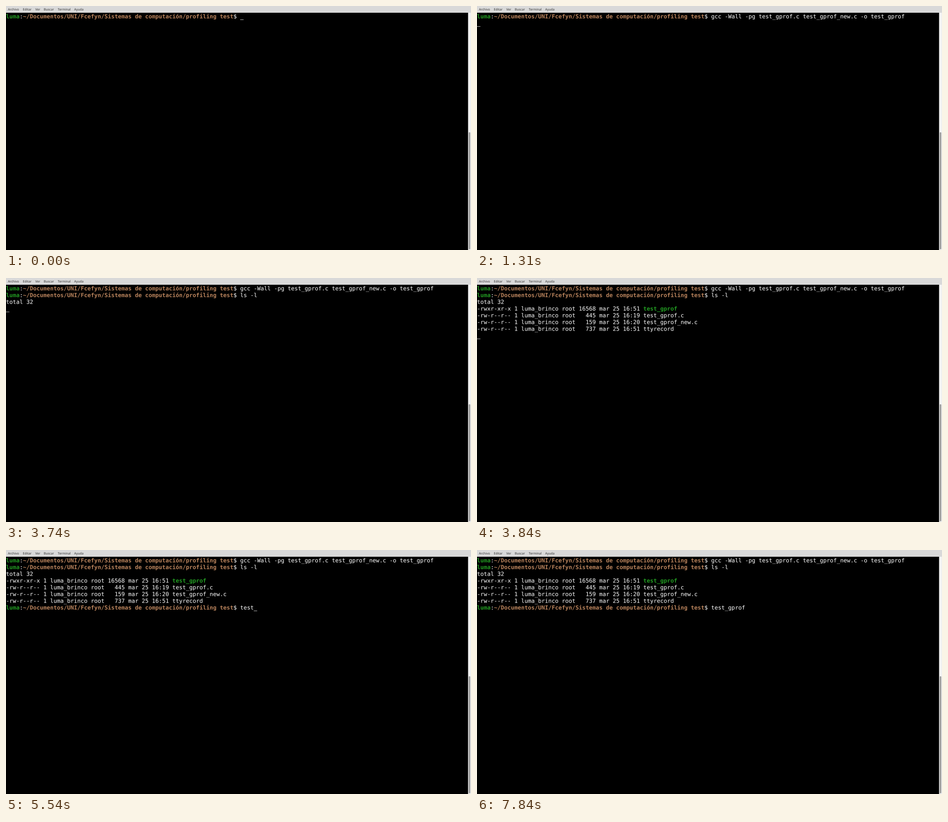
Write an HTML page with a canvas that moves like this. It is 1031x543 px and loops after 8 s.

```html
<!DOCTYPE html>
<html lang="es">
<head>
<meta charset="utf-8">
<title>Terminal</title>
<style>
  html, body { margin: 0; width: 100%; height: 100%; overflow: hidden; background: #000; }
  canvas { display: block; width: 1031px; height: 543px; }
</style>
</head>
<body>
<canvas id="stage"></canvas>
<script>
const WIDTH = 1031, HEIGHT = 543, DENSITY = 2, LOOP = 8000;
const FONT_SIZE = 12.5, ROW = 15, TOP = 15.5;
const WHITE = "#fff", GREEN = "#229a22", PATH = "#b9835c";
const USER = "luma", OWNER = "luma_brinco";
const COMPILE = "gcc -Wall -pg test_gprof.c test_gprof_new.c -o test_gprof";

const canvas = document.getElementById("stage");
const ctx = canvas.getContext("2d");
canvas.width = WIDTH * DENSITY;
canvas.height = HEIGHT * DENSITY;
ctx.scale(DENSITY, DENSITY);
ctx.textRendering = "geometricPrecision";

const monoFont = bold =>
  `${bold ? "bold " : ""}${FONT_SIZE}px "DejaVu Sans Mono", monospace`;
ctx.font = monoFont(false);
const CELL = ctx.measureText("m".repeat(100)).width / 100;

// A row is a list of runs: [text, color, bold].
const plain = text => [text, WHITE, false];
const prompt = command => [
  [USER, GREEN, true],
  plain(":"),
  ["~/Documentos/UNI/Fcefyn/Sistemas de computación/profiling test", PATH, true],
  plain("$ "),
  plain(command)
];
const file = (mode, size, time, name) => [
  plain(`${mode} 1 ${OWNER} root ${String(size).padStart(5)} mar 25 ${time} `),
  mode.includes("x") ? [name, GREEN, true] : plain(name)
];

const history = [
  prompt(COMPILE),
  prompt("ls -l"),
  [plain("total 32")],
  file("-rwxr-xr-x", 16568, "16:51", "test_gprof"),
  file("-rw-r--r--", 445, "16:19", "test_gprof.c"),
  file("-rw-r--r--", 159, "16:20", "test_gprof_new.c"),
  file("-rw-r--r--", 737, "16:51", "ttyrecord")
];

// [start ms, finished rows, command on the prompt (null: no prompt), cursor shown]
const steps = [
  [0, 0, "", true],
  [660, 0, COMPILE, true],
  [1310, 1, null, true],
  [1360, 1, "", true],
  [2130, 1, "l", true],
  [2240, 1, "ls", false],
  [2600, 1, "ls -", false],
  [3110, 1, "ls -l", false],
  [3740, 3, null, true],
  [3840, 7, null, true],
  [4800, 7, "t", true],
  [4960, 7, "te", true],
  [5370, 7, "tes", true],
  [5540, 7, "test", true],
  [6790, 7, "test_", false],
  [7230, 7, "test_g", false],
  [7420, 7, "test_gp", false],
  [7550, 7, "test_gpr", false],
  [7700, 7, "test_gpro", false],
  [7840, 7, "test_gprof", false]
];

function fillRect(color, x, y, width, height) {
  ctx.fillStyle = color;
  ctx.fillRect(x, y, width, height);
}

function drawRow(runs, row, selectedText) {
  const top = TOP + row * ROW;
  let column = 0;
  for (const [text, color, bold] of runs) {
    const selected = text && text === selectedText;
    if (selected) fillRect(WHITE, column * CELL, top, text.length * CELL, ROW + 0.25);
    ctx.font = monoFont(bold);
    ctx.fillStyle = selected ? "#000" : color;
    ctx.fillText(text, column * CELL, top + 12);
    column += text.length;
  }
  return column;
}

function drawWindow() {
  fillRect("#000", 0, 0, WIDTH, HEIGHT);
  fillRect("#f2f2f2", 1024.5, 15, 6.5, HEIGHT - 15);
  ctx.fillStyle = "#999";
  ctx.beginPath();
  ctx.roundRect(1026, 281, 3.4, 260.5, 1.5);
  ctx.fill();
  fillRect("#d9d9d9", 0, 0, WIDTH, 15);
  ctx.font = '7px "Noto Sans", sans-serif';
  ctx.fillStyle = "#333";
  const menu = { Archivo: 4.2, Editar: 37.3, Ver: 65, Buscar: 83.8, Terminal: 114.7, Ayuda: 151.3 };
  for (const [label, x] of Object.entries(menu)) ctx.fillText(label, x, 10.2);
}

function draw() {
  const time = performance.now() % LOOP;
  const [, finished, command, cursor] = steps.findLast(([start]) => start <= time);
  drawWindow();
  history.slice(0, finished).forEach((runs, row) => drawRow(runs, row));
  const column = drawRow(command === null ? [] : prompt(command), finished, COMPILE);
  if (cursor) fillRect(WHITE, column * CELL, TOP + finished * ROW + 14.5, CELL, 0.75);
  requestAnimationFrame(draw);
}
draw();
</script>
</body>
</html>
```
